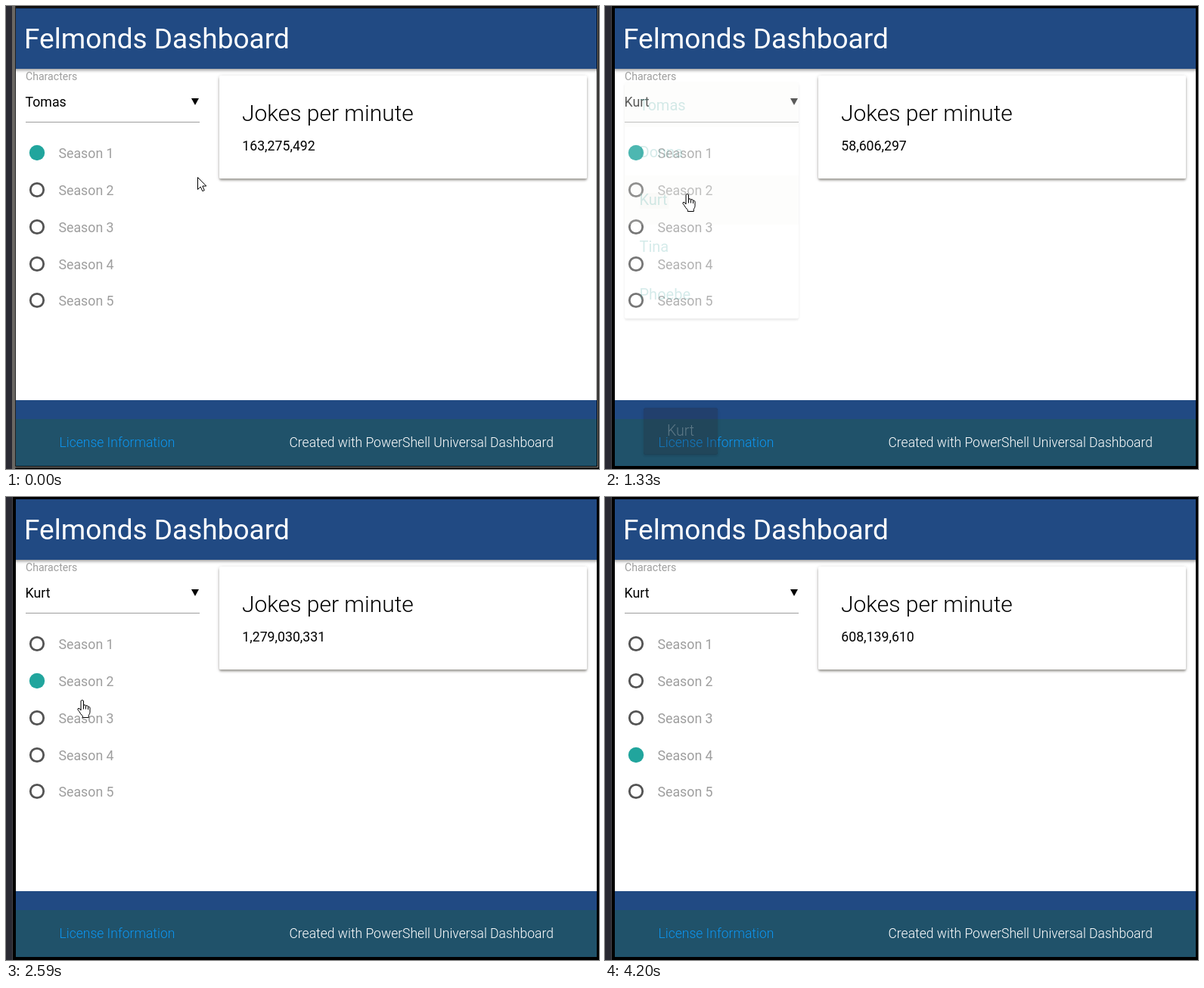
Write an HTML page with a canvas that moves like this. It is 784x612 px and loops after 4930 ms.

```html
<!DOCTYPE html>
<html lang="en">
<head>
<meta charset="utf-8">
<title>Dashboard</title>
<style>
html, body { margin: 0; width: 100%; height: 100%; overflow: hidden; background: #000; }
canvas { display: block; width: 784px; height: 612px; }
</style>
</head>
<body>
<canvas id="stage" width="784" height="612"></canvas>
<script>
const ctx = document.getElementById('stage').getContext('2d');
const LOOP = 4930;
const FAMILY = 'Roboto, "Open Sans", sans-serif';
const BLUE = '#214a83', TEAL = '#21a59d', GREY = '#9e9e9e';
const NAMES = ['Tomas', 'Donna', 'Kurt', 'Tina', 'Phoebe'];

// Event times in ms
const OPEN = 290, PICK = 1150, TOAST_IN = 1300, TOAST_OUT = 2238;
const CLICKS = [-1000, 2080, 2860, 3720, 1e6];
const COUNTS = [
  [0, '163,275,492'], [1300, '58,606,297'], [2190, '1,279,030,331'],
  [2950, '987,994,088'], [3840, '608,139,610']
];

// Pointer path: time, x, y
const PATH = [
  [0, 253, 226], [30, 253, 226], [270, 160, 133], [600, 160, 133],
  [880, 121, 206], [960, 121, 206], [1130, 108, 248], [1740, 108, 248],
  [2040, 100, 238], [2350, 100, 238], [2720, 100, 280], [3120, 100, 280],
  [3380, 100, 318], [3520, 100, 333], [3850, 100, 333]
];

const clamp = v => Math.max(0, Math.min(1, v));
const outCubic = p => 1 - (1 - p) ** 3;
const outExpo = p => p >= 1 ? 1 : 1 - 2 ** (-10 * p);
const smooth = p => p * p * (3 - 2 * p);

// cubic-bezier(.25, .1, .25, 1)
function cssEase(p) {
  if (p <= 0 || p >= 1) return clamp(p);
  const bez = (a, b, s) => 3 * a * s * (1 - s) ** 2 + 3 * b * s * s * (1 - s) + s ** 3;
  let lo = 0, hi = 1;
  for (let i = 0; i < 18; i++) {
    const mid = (lo + hi) / 2;
    if (bez(.25, .25, mid) < p) lo = mid; else hi = mid;
  }
  return bez(.1, 1, lo);
}

function rect(x, y, w, h, color) {
  ctx.fillStyle = color;
  ctx.fillRect(x, y, w, h);
}

function text(str, x, y, size, color, weight = 400) {
  ctx.font = `${weight} ${size}px ${FAMILY}`;
  ctx.fillStyle = color;
  ctx.fillText(str, x, y);
}

function disc(x, y, r, color) {
  ctx.fillStyle = color;
  ctx.beginPath();
  ctx.arc(x, y, r, 0, 7);
  ctx.fill();
}

// Raised surface; its shadow is kept outside so that it can fade evenly
function panel(x, y, w, h, color) {
  const box = new Path2D();
  box.roundRect(x, y, w, h, 2.5);
  const outside = new Path2D(box);
  outside.rect(0, 0, 784, 700);
  ctx.save();
  ctx.clip(outside, 'evenodd');
  ctx.fillStyle = color;
  for (const [dy, blur, a] of [[2.5, 2.5, .3], [1.2, 5, .2]]) {
    ctx.shadowColor = `rgba(20,16,0,${a})`;
    ctx.shadowOffsetY = dy;
    ctx.shadowBlur = blur;
    ctx.fill(box);
  }
  ctx.restore();
  ctx.fillStyle = color;
  ctx.fill(box);
}

function drawFrame(t) {
  rect(0, 0, 784, 612, '#000');
  rect(0, 0, 8, 612, '#2a2a33');
  rect(8, 0, 1, 612, '#44444a');
  if (t < 30) {
    rect(8, 0, 4, 612, '#6a6763');
    rect(12, 0, 1, 612, '#222');
    rect(12, 1, 772, 1, '#26262a');
    rect(782, 0, 1, 610, '#8a8884');
    rect(12, 609, 771, 1, '#8a8884');
  }
  rect(13, 3, 768, 605, '#fff');
}

function drawHeader() {
  ctx.save();
  ctx.beginPath();
  ctx.rect(13, 3, 768, 605);
  ctx.clip();
  ctx.shadowColor = 'rgba(0,0,0,.4)';
  ctx.shadowOffsetY = 2;
  ctx.shadowBlur = 4;
  rect(8, -10, 778, 93, BLUE);
  ctx.restore();
  text('Felmonds Dashboard', 24, 56, 37, '#fff');
}

function drawFooter() {
  rect(13, 521, 768, 25, BLUE);
  rect(13, 546, 768, 62, '#20526a');
  text('License Information', 70.5, 583, 17.53, '#0c95f0', 300);
  text('Created with PowerShell Universal Dashboard', 374.5, 583, 17.53, '#fff', 300);
}

function drawCard(t) {
  panel(282, 92, 486, 136, '#fff');
  text('Jokes per minute', 312, 152, 30, '#000', 300);
  const count = COUNTS.filter(c => t >= c[0]).pop()[1];
  text(count, 312.3, 191, 17.7, '#000');
}

function drawSelect(t) {
  text('Characters', 26, 98, 14.1, GREY);
  text(NAMES[t < PICK ? 0 : 2], 25.5, 133, 17.75, '#000');
  ctx.fillStyle = '#000';
  ctx.beginPath();
  ctx.moveTo(245, 122);
  ctx.lineTo(255, 122);
  ctx.lineTo(250, 131);
  ctx.fill();
  rect(26, 153, 230, 1, GREY);
}

function drawSeasons(t) {
  for (let i = 0; i < 5; i++) {
    const y = Math.round(194.3 + 48.75 * i);
    const since = k => k < CLICKS.length ? cssEase((t - CLICKS[k]) / 280) : 0;
    const on = since(i) - since(i + 1);
    ctx.lineWidth = 2.8;
    ctx.strokeStyle = `rgba(84,84,84,${1 - on})`;
    ctx.beginPath();
    ctx.arc(41, y, 8.7, 0, 7);
    ctx.stroke();
    if (on > 0) disc(41, y, 10.2 * on, t > CLICKS[i + 1] ? '#5c7c7a' : TEAL);
    text('Season ' + (i + 1), 69.5, y + 7, 17.75, GREY);
  }
}

function drawMenu(t, pointer) {
  const p = clamp((t - OPEN) / 300);
  const shown = Math.sin(p * Math.PI / 2) * (1 - clamp((t - PICK) / 225));
  if (shown <= 0) return;
  const h = 312 * outCubic(p);
  ctx.save();
  ctx.globalAlpha = shown;
  panel(26, 101, 230, h, '#fff');
  ctx.beginPath();
  ctx.rect(26, 101, 230, h);
  ctx.clip();
  const hover = Math.floor((pointer.y - 101) / 62.4);
  NAMES.forEach((name, i) => {
    const y = 101 + 62.4 * i;
    if (i === 0) rect(26, y, 230, 59, '#f6f6ee');
    else if (i === hover) {
      rect(26, Math.round(y) - 2, 230, 65, '#f6f6ee');
      ctx.font = `400 20px ${FAMILY}`;
      rect(46, Math.round(y) + 21, ctx.measureText(name).width + 1, 21, '#ebebe6');
    }
    text(name, 45.5, Math.round(y + 37), 20, '#2f9d94');
  });
  ctx.restore();
}

function drawToast(t) {
  if (t < TOAST_IN) return;
  const p = outCubic(clamp((t - TOAST_IN) / 300));
  const alpha = p * (1 - outExpo(clamp((t - TOAST_OUT) / 375)));
  if (alpha < .004) return;
  ctx.save();
  ctx.globalAlpha = alpha;
  ctx.translate(0, 35 * (1 - p));
  panel(51, 506, 98, 61, '#282830');
  text(NAMES[2], 82, 542, 19.5, '#fff', 300);
  ctx.restore();
}

function pointerAt(t) {
  if (t >= 3850) {
    const p = ((t - 3850) / 350) ** 1.6;
    return { x: 100 + 700 * p, y: 333 + 214 * p };
  }
  let i = 0;
  while (i < PATH.length - 2 && t >= PATH[i + 1][0]) i++;
  const [t0, x0, y0] = PATH[i], [t1, x1, y1] = PATH[i + 1];
  const k = smooth(clamp((t - t0) / (t1 - t0)));
  return { x: x0 + (x1 - x0) * k, y: y0 + (y1 - y0) * k };
}

const HAND = new Path2D('M-1 14V2Q-1 .5 .7 .5T2.5 2V8Q2.5 6.7 4 6.8T5.5 8.5Q5.7 7.5 7 7.7T8.5 9.5' +
  'Q8.8 8.8 9.9 9.2T11 11V16.5Q11 18.5 9.3 20.5V23.5H1.3V21.5Q-1.5 19-3 15.8L-5 13.2' +
  'Q-5.5 11.5-4 11.3T-1 14Z');
const HAND_LINES = new Path2D('M2.5 8V12.5M5.5 8.5V12.5M8.5 9.5V13');
const ARROW = new Path2D('M.5 .5V16.5L4.2 13L6.8 18.7L9.3 17.6L6.8 12H11.8Z');

function drawPointer(t, { x, y }) {
  if (t >= 4200) return;
  const hand = t < 3850 ? y < 154 || t > 500 : x < 142;
  ctx.save();
  ctx.translate(Math.round(x), Math.round(y));
  ctx.fillStyle = '#fff';
  ctx.strokeStyle = '#000';
  ctx.lineWidth = 1;
  ctx.lineJoin = 'round';
  const shape = hand ? HAND : ARROW;
  ctx.fill(shape);
  ctx.stroke(shape);
  if (hand) ctx.stroke(HAND_LINES);
  ctx.restore();
}

function draw(t) {
  const pointer = pointerAt(t);
  drawFrame(t);
  drawCard(t);
  drawHeader();
  drawSelect(t);
  drawSeasons(t);
  drawFooter();
  drawMenu(t, pointer);
  drawToast(t);
  drawPointer(t, pointer);
}

let start;
function tick(now) {
  if (start === undefined) start = now;
  draw(Math.max(0, now - start) % LOOP);
  requestAnimationFrame(tick);
}
draw(0);
requestAnimationFrame(tick);
</script>
</body>
</html>
```
